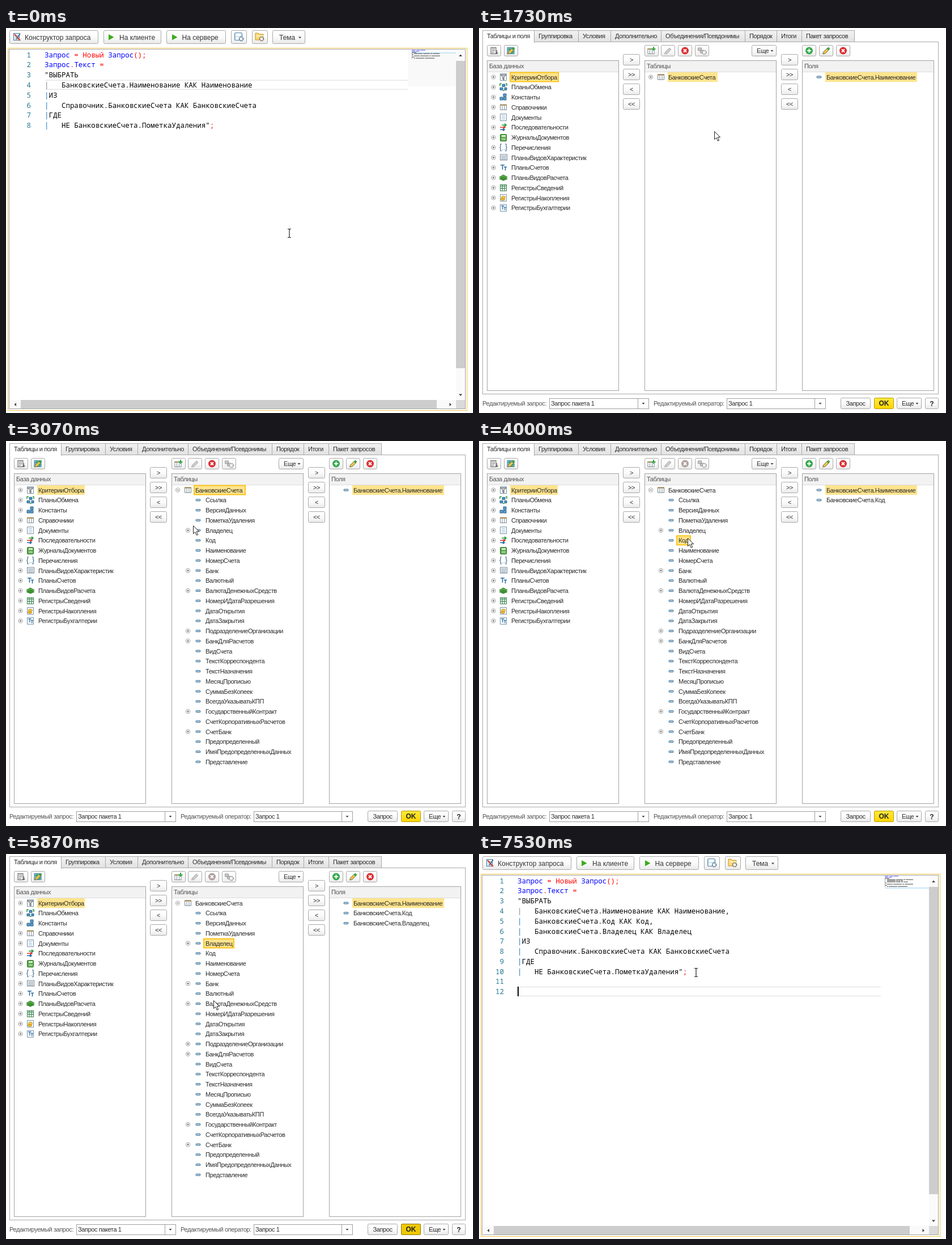
Recreate the animation shown at these times as an HTML page. Size 824x679 px, loop 8 s.

```html
<!DOCTYPE html>
<html lang="ru">
<head>
<meta charset="utf-8">
<title>Конструктор запроса</title>
<style>
html, body { margin: 0; width: 100%; height: 100%; overflow: hidden; background: #fff; }
svg { display: block; }
text { white-space: pre; font-family: "Liberation Sans", Arial, sans-serif; }
.tool text { font-size: 12px; fill: #333; }
#dialog text { font-size: 11px; letter-spacing: -.4px; fill: #2b2b2b; }
#dialog .head { fill: #555; }
#dialog .bold { font-weight: bold; font-size: 12px; letter-spacing: 0; fill: #222; }
#editor .code { font: 12.47px "Noto Sans Mono", "DejaVu Sans Mono", monospace; fill: #000; }
#editor .num { fill: #237893; text-anchor: end; }
.mid { text-anchor: middle; }
</style>
</head>
<body>
<svg id="stage" width="824" height="679" viewBox="0 0 824 679">
  <defs>
    <linearGradient id="face" x2="0" y2="1"><stop stop-color="#fff"/><stop offset=".5" stop-color="#fbfbfb"/><stop offset="1" stop-color="#e9e9e9"/></linearGradient>
    <linearGradient id="tab" x2="0" y2="1"><stop stop-color="#f2f2f2"/><stop offset="1" stop-color="#e2e2e2"/></linearGradient>
    <linearGradient id="gold" x2="0" y2="1"><stop stop-color="#ffe83c"/><stop offset="1" stop-color="#ffd500"/></linearGradient>
  </defs>
  <g id="editor"></g>
  <g id="dialog"></g>
  <g id="pointer">
    <path id="arrow" d="M.5.5V14.5L3.8 11.4L6.3 17.2L8.6 16.2L6.2 10.6H10.6Z" fill="#fff" stroke="#222"/>
    <path id="beam" d="M-3-7.5H-1L0-6.5L1-7.5H3M0-6.5V6.5M-3 7.5H-1L0 6.5L1 7.5H3" fill="none" stroke="#222" stroke-width="1.2"/>
  </g>
</svg>
<script>
const $ = id => document.getElementById(id);
const show = (id, on) => { $(id).style.display = on ? '' : 'none'; };

const rect = (x, y, w, h, fill, stroke, more = '') =>
  stroke ? `<rect x="${x + .5}" y="${y + .5}" width="${w - 1}" height="${h - 1}" fill="${fill}" stroke="${stroke}" ${more}/>`
         : `<rect x="${x}" y="${y}" width="${w}" height="${h}" fill="${fill}" ${more}/>`;
const text = (x, y, s, cls = '', fill) =>
  `<text x="${x}" y="${y}" class="${cls}"${fill ? ` style="fill:${fill}"` : ''}>${s}</text>`;
const path = (d, fill, stroke = 'none', w = 1) => `<path d="${d}" fill="${fill}" stroke="${stroke}" stroke-width="${w}"/>`;
const at = (x, y, body, more = '') => `<g transform="translate(${x} ${y})" ${more}>${body}</g>`;
const group = (id, body) => `<g id="${id}">${body}</g>`;
const esc = s => s.replace(/</g, '&lt;').replace(/>/g, '&gt;');
const button = (x, y, w, h, body = '') => rect(x, y, w, h, 'url(#face)', '#a9a9a9', 'rx="2"') + body;
const caption = (x, y, w, h, s) => button(x, y, w, h, text(x + w / 2, y + h / 2 + 4, esc(s), 'mid'));
const drop = (x, y) => path(`M${x - 2.5} ${y - 1}h5l-2.5 3z`, '#444');

/* ---------- code editor ---------- */
const PITCH = 17.78, CHAR = 7.48, LEFT = 68;
const top0 = n => 38 + (n - 1) * PITCH;
const head = ['Запрос = Новый Запрос();', 'Запрос.Текст =', '"ВЫБРАТЬ'];
const tail = ['|ИЗ', '|   Справочник.БанковскиеСчета КАК БанковскиеСчета', '|ГДЕ', '|   НЕ БанковскиеСчета.ПометкаУдаления";'];
const field = '|   БанковскиеСчета.';
const before = [...head, field + 'Наименование КАК Наименование', ...tail];
const after = [...head, field + 'Наименование КАК Наименование,', field + 'Код КАК Код,', field + 'Владелец КАК Владелец', ...tail];

const paint = (s, fill) => `<tspan style="fill:${fill}">${s}</tspan>`;
const colour = (s, i) => i < 2
  ? paint(s.replace(/Запрос|Текст/g, w => paint(w, '#00f')), '#f00')
  : s.replace(/^\|/, paint('|', i === 3 ? '#777' : '#0b6cb8')).replace(/;$/, m => paint(m, '#f00'));
const number = n => text(44, top0(n) + 13.6, n, 'code num');
const miniLine = (s, i) => [...s.matchAll(/[^\s.]+/g)].map(m =>
  rect(716 + m.index, 38.6 + i * 2, m[0].length, 1.2, i < 2 ? '#44f' : '#222', '', 'opacity=".7"')).join('');
const listing = lines => lines.map((s, i) =>
  number(i + 1) + text(LEFT, top0(i + 1) + 13.6, colour(s, i), 'code') + miniLine(s, i)).join('');

const play = x => path(`M${x} 11v10.4l9.5-5.2z`, '#3bab1c');
const gear = (x, y, c) => `<circle cx="${x}" cy="${y}" r="3.4" fill="#fff" stroke="${c}" stroke-width="2" stroke-dasharray="1.8 .9"/>`;
const toolbar = button(6, 4, 157, 24, group('hover', rect(6, 4, 157, 24, 'url(#tab)', '#777', 'rx="2"')) +
    rect(13, 9, 11, 13, '#f4f9fd', '#3977a8') + path('M15 13h7M15 16h7M15 19h7', 'none', '#8db6d5') +
    path('M15 11l10 11', 'none', '#d9472b', 2.4) + path('M18 20l7-10', 'none', '#3d688a', 1.6) + text(33, 20.5, 'Конструктор запроса')) +
  button(172, 4, 102, 24, play(181) + text(200, 20.5, 'На клиенте')) +
  button(283, 4, 105, 24, play(293) + text(310.5, 20.5, 'На сервере')) +
  button(397, 4, 28, 24, rect(403, 8, 14, 14, '#cfe2f0', '#4b7ea5', 'rx="1"') + rect(406, 9, 8, 5, '#fff') + rect(406, 16, 6, 5, '#fff') + gear(415, 19, '#4b7897')) +
  button(434, 4, 28, 24, path('M440 21V9h5l2 2h7v10z', '#ffd877', '#c0902b') + path('M442 14h13', 'none', '#fff3c4', 2) + gear(451, 19, '#7b6b50')) +
  button(470, 4, 58, 24, text(482, 20.5, 'Тема') + drop(518.5, 16.5));

const scrollbars = rect(794, 38, 16, 617, '#fafafa') + rect(794, 58, 16, 542, '#cdcdcd') +
  rect(6, 656, 788, 15, '#fafafa') + rect(26, 656, 734, 15, '#cdcdcd') + rect(794, 656, 16, 15, '#dadada') +
  path('M799 50l3-3.5 3 3.5zM799 645.5l3 3.5 3-3.5zM18 661l-3.5 3 3.5 3zM782.5 661l3.5 3-3.5 3z', '#444');

$('editor').innerHTML = `<g class="tool">${toolbar}</g>` +
  rect(3, 35, 811, 640, '#fff', '#f5c84a') + rect(5, 37, 806, 635, '#fff', '#a3a3a3') +
  group('slider', rect(709, 38, 85, 65, '#f9f9f9')) +
  group('line', path('M69 .9H709M69 16.9H709', 'none', '#e6e6e6', 1.5)) +
  group('miniMark', rect(716, 0, 78, 2, '#c9e6fa')) +
  group('before', listing(before)) + group('after', listing(after)) +
  group('n11', number(11)) + group('n12', number(12)) +
  group('caret', rect(0, 0, 2, 17, '#000')) + scrollbars;

/* ---------- query dialog ---------- */
const ROW = 17.75;
const rowY = i => 86.5 + i * ROW;
const sheet = '<path d="M-5.5-6h11v12h-11z" fill="#f6fafd" stroke="#7793a8"/>';
const T = c => `<path d="M-5-4.5h7M-1.5-4.5v8M1-1h5M3.5-1v6" fill="none" stroke="${c}" stroke-width="1.6"/>`;
const table = rect(-6, -5, 12, 10, '#fff', '#7c8a94') + rect(-6, -5, 12, 2, '#a58a52') + path('M-2-3v8M2-3v8', 'none', '#7c8a94');
const icons = [
  sheet + path('M-5-4h10l-4 4v5l-2-1v-4z', '#ccc', '#555'),
  path('M-2-5h5v4h-5zM-6 1h5v4h-5zM2 1h4v4h-4z', '#4c93c4', '#2b668f') + path('M-6-2v-4h3M6-2v-4h-2M-1 6h3', 'none', '#2f9e48', 1.6),
  path('M-6 0h5v5h-5zM0 0h5v5h-5zM0-6h5v5h-5z', '#5b9ccb', '#2b668f'),
  table,
  sheet + path('M-3-3h6M-3 0h6M-3 3h6', 'none', '#9dbbd2'),
  path('M-3-4h8M2-6.500l3 2.500-3 2.500', 'none', '#2e9b40', 1.7) + path('M-6 0h8M0-2l3 2-3 2', 'none', '#d8402e', 1.7) + path('M-6 4h7M-1 2l3 2-3 2', 'none', '#2d6da8', 1.7),
  rect(-6, -6, 12, 13, '#5aa84c', '#2e7228', 'rx="1"') + rect(-3, -4, 7, 3, '#d8efcf') + path('M-3 2h7M-3 4h7', 'none', '#cfe8c6'),
  path('M-3-6h-2v4l-1 2 1 2v4h2M3-6h2v4l1 2-1 2v4h-2M-2 4h1M1 4h1', 'none', '#3f6f93', 1.2),
  rect(-6, -6, 13, 11, '#fff', '#71818d') + path('M-4-3h9M-4-1h9M-4 1h9M-4 3h9', 'none', '#8aa0b0', 1.2),
  T('#2d6f9f'),
  path('M-7-1l7-4 7 4-7 3z', '#58ae45', '#2e7d28') + path('M-7 2l7-3 7 3-7 3z', '#3f9531', '#2e7d28'),
  rect(-6, -6, 12, 12, '#fff', '#35734a') + path('M-6-3h12M-6 1h12M-2-6v12M2-6v12', 'none', '#4a9460', 1.3),
  sheet + '<ellipse cx="0" cy="-1" rx="3.500" ry="2" fill="#ffd95a" stroke="#bb8a10"/><ellipse cx="-1" cy="2.500" rx="3.500" ry="2" fill="#f3b92c" stroke="#bb8a10"/>',
  sheet + `<g transform="scale(.8)">${T('#2d6f9f')}</g>`
];
const plus = (x, y, open) => `<circle cx="${x}" cy="${y}" r="3.700" fill="#fff" stroke="#a5a5a5"/>` +
  path(`M${x - 2} ${y}h4${open ? '' : `M${x} ${y - 2}v4`}`, 'none', '#666');
const dash = (x, y) => rect(x - 4.5, y - 2, 9, 4, '#a9cbe3', '#4d7795', 'rx="1"');
const mark = (x, i, w) => rect(x, rowY(i) - 8.5, w, 17, '#ffe48d');
const focus = (x, i, w) => `<rect x="${x + 1}" y="${rowY(i) - 8}" width="${w - 2}" height="16" fill="#ffe48d" stroke="#fdc51c" stroke-width="2"/>`;
const label = (x, i, s) => text(x, rowY(i) + 4, s);

const tabs = [[6, 'Таблицы и поля'], [97, 'Группировка'], [175, 'Условия'], [232, 'Дополнительно'], [321, 'Объединения/Псевдонимы'],
  [469, 'Порядок'], [525, 'Итоги'], [569, 'Пакет запросов'], [662]];
const tabBar = tabs.slice(0, -1).map(([x, s], i) =>
  rect(x, 4, tabs[i + 1][0] - x + 1, i ? 21 : 22, i ? 'url(#tab)' : '#fff', '#a9a9a9') + text(x + 8, 18, s)).join('');
const panel = (x, w, s) => rect(x, 57, w, 583, '#fff', '#a3a3a3') + rect(x + 1, 58, w - 2, 19, '#f2f2f2') +
  rect(x + 1, 77, w - 2, 1, '#dcdcdc') + text(x + 4, 71, s, 'head');
const movers = x => ['>', '>>', '<', '<<'].map((s, i) => caption(x, 46 + i * 26, 30, 20, s)).join('');
const tool = (x, icon, more = '') => button(x, 30, 25, 20) + at(x + 12.5, 40, icon, more);
const pencil = path('M-6 6l1.500-4 7-7 3 3-7 7z', '#f0c54a', '#6b6b4c') + path('M1-3.500l3 3 3-3-3-3z', '#3fa34d');
const disc = (c, d) => `<circle r="6.500" fill="${c}"/>` + path(d, 'none', '#fff', 2);
const cross = 'M-2.500-2.500l5 5M2.500-2.500l-5 5', add = 'M-3.500 0h7M0-3.500v7';
const grey = path('M-6 6l1.500-4 7-7 3 3-7 7z', '#ccc', '#aaa');
const combo = (x, w, s) => rect(x, 653, w, 19, '#fff', '#9f9f9f') + rect(x + w - 20, 653, 1, 19, '#9f9f9f') +
  text(x + 3, 666, s) + drop(x + w - 10, 662);

const roots = ['КритерииОтбора', 'ПланыОбмена', 'Константы', 'Справочники', 'Документы', 'Последовательности', 'ЖурналыДокументов',
  'Перечисления', 'ПланыВидовХарактеристик', 'ПланыСчетов', 'ПланыВидовРасчета', 'РегистрыСведений', 'РегистрыНакопления', 'РегистрыБухгалтерии'];
// "+" marks an expandable field
const fields = ('Ссылка ВерсияДанных ПометкаУдаления +Владелец Код Наименование НомерСчета +Банк Валютный +ВалютаДенежныхСредств ' +
  'НомерИДатаРазрешения ДатаОткрытия ДатаЗакрытия +ПодразделениеОрганизации +БанкДляРасчетов ВидСчета ТекстКорреспондента ' +
  'ТекстНазначения МесяцПрописью СуммаБезКопеек ВсегдаУказыватьКПП +ГосударственныйКонтракт СчетКорпоративныхРасчетов ' +
  '+СчетБанк Предопределенный ИмяПредопределенныхДанных Представление').split(' ');
const child = (s, k) => (s[0] === '+' ? plus(321, rowY(k + 1)) : '') + dash(339, rowY(k + 1)) + label(352, k + 1, s.replace('+', ''));
const chosen = (s, i) => dash(600, rowY(i)) + label(613, i, 'БанковскиеСчета.' + s);

$('dialog').innerHTML = rect(0, 0, 824, 679, '#fff') + rect(6, 24, 805, 622, '#fff', '#a9a9a9') + tabBar + rect(7, 23, 90, 4, '#fff') +
  tool(14, rect(-6, -6, 10, 12, '#fff', '#555') + path('M-4-3h6M-4 0h6M-4 3h4M5-1v6M3 3l2 3 2-3', 'none', '#555')) +
  tool(44, rect(-7, -6, 13, 12, '#82b7d8', '#4383a8') + path('M-6-2h4v-4M2 6v-4h4', 'none', '#2f9e48', 1.7) + pencil) +
  tool(292, at(-1, 1, table) + path('M0-3h7M3.500-7v7', 'none', '#2fa544', 2.2)) + tool(321, grey) +
  tool(351, group('delOn', disc('#dc2f33', cross)) + group('delOff', disc('#b3a0a0', cross))) +
  tool(381, path('M-7-5h6v5h-6zM-3-1h5v5h-5z', '#c9c9c9', '#999') + gear(4, 3, '#999')) +
  button(481, 30, 44, 20, text(490, 44, 'Еще') + drop(517, 40)) +
  tool(570, disc('#35aa4d', add)) + tool(600, pencil) + tool(630, disc('#dc2f33', cross)) +
  panel(14, 233, 'База данных') + panel(292, 233, 'Таблицы') + panel(570, 233, 'Поля') + movers(254) + movers(533) +
  mark(55, 0, 84) + group('selRoot', focus(54, 0, 87)) +
  group('markTable', mark(333, 0, 88)) + group('selTable', focus(331, 0, 92)) +
  group('selCode', focus(348, 5, 26)) + group('selOwner', focus(348, 4, 55)) + mark(611, 0, 162) +
  roots.map((s, i) => plus(25.5, rowY(i)) + at(43, rowY(i), icons[i]) + label(57, i, s)).join('') +
  group('closed', plus(303, rowY(0))) + group('open', plus(303, rowY(0), true) + fields.map(child).join('')) +
  at(321, rowY(0), table) + label(334, 0, 'БанковскиеСчета') +
  chosen('Наименование', 0) + group('addCode', chosen('Код', 1)) + group('addOwner', chosen('Владелец', 2)) +
  text(6, 666, 'Редактируемый запрос:', 'head') + combo(124, 176, 'Запрос пакета 1') +
  text(308, 666, 'Редактируемый оператор:', 'head') + combo(437, 175, 'Запрос 1') +
  caption(638, 652, 53, 20, 'Запрос') +
  rect(697, 652, 35, 20, 'url(#gold)', '#b99a00', 'rx="2"') + group('okDown', rect(697, 652, 35, 20, '#eec900', '#8f7700', 'rx="2"')) +
  text(714.5, 666, 'OK', 'bold mid') +
  button(737, 652, 44, 20, text(746, 666, 'Еще') + drop(773, 662)) +
  button(787, 652, 24, 20, text(799, 666.5, '?', 'bold mid'));

/* ---------- timeline ---------- */
const LOOP = 8000, STEP = 200 / 3;
// time, x, y, and 1 where the stretch leading there is linear
const track = [[0, 500, 362], [800, 175, 138], [870, 175, 138], [1130, 115, 20], [1265, 115, 20], [1530, 415, 182], [1730, 415, 182],
  [1930, 415, 178], [2530, 303, 86], [2665, 303, 86], [3070, 330, 150, 1], [3400, 357, 163, 1], [3465, 357, 163], [3670, 366, 176],
  [3930, 366, 176], [4130, 372, 160], [4330, 372, 160], [4665, 482, 233], [5470, 714, 662], [5600, 714, 662], [5865, 366, 258],
  [6065, 366, 258], [6400, 370, 207], [6600, 370, 207], [6800, 383, 209], [LOOP, 383, 209]];

function pointerAt(t) {
  const i = track.findIndex(k => k[0] > t);
  const [t0, x0, y0] = track[i - 1], [t1, x1, y1, linear] = track[i];
  const u = (t - t0) / (t1 - t0), e = linear ? u : u * u * (3 - 2 * u);
  return [x0 + (x1 - x0) * e, y0 + (y1 - y0) * e];
}

function draw(t) {
  const within = (a, b) => t >= a && t < b;
  const dialog = within(1730, 6000), done = t >= 6000;
  show('dialog', dialog);
  show('editor', !dialog);

  const line = t < 800 ? 4 : t < 6590 ? 6 : t < 7390 ? 10 : t < 7530 ? 11 : 12;
  show('before', !done);
  show('after', done);
  show('n11', line > 10);
  show('n12', line > 11);
  $('slider').style.opacity = Math.max(0, 1 - t / 600);
  $('line').setAttribute('transform', `translate(0 ${top0(line)})`);
  $('miniMark').setAttribute('transform', `translate(0 ${37 + (line - 1) * 2})`);
  const col = line === 6 ? 14 : line === 10 ? 40 : 0;
  $('caret').setAttribute('transform', `translate(${Math.round(LEFT + col * CHAR - (col ? .7 : 0))} ${top0(line) + .3})`);
  show('caret', within(800, 1330) || within(6590, 7130) || t >= 7390);

  const opened = t >= 2600, code = t >= 3865, owner = t >= 4260;
  show('selRoot', !opened);
  show('markTable', !opened);
  show('selTable', opened && !code);
  show('closed', !opened);
  show('open', opened);
  show('selCode', code && !owner);
  show('selOwner', owner);
  show('addCode', t >= 3930);
  show('addOwner', t >= 4330);
  show('delOn', !code);
  show('delOff', code);
  show('okDown', t >= 5460);

  const [x, y] = pointerAt(t).map(Math.round);
  const inCode = !dialog && y > 38;
  show('beam', inCode);
  show('arrow', !inCode);
  show('hover', !dialog && y < 28 && x > 6 && x < 163);
  $('pointer').setAttribute('transform', `translate(${x} ${y})`);
}

const start = performance.now();
function tick(now) {
  const t = Math.max(0, now - start) % LOOP;
  draw(Math.floor((t + 4) / STEP) * STEP % LOOP);
  requestAnimationFrame(tick);
}
draw(0);
requestAnimationFrame(tick);
</script>
</body>
</html>
```
